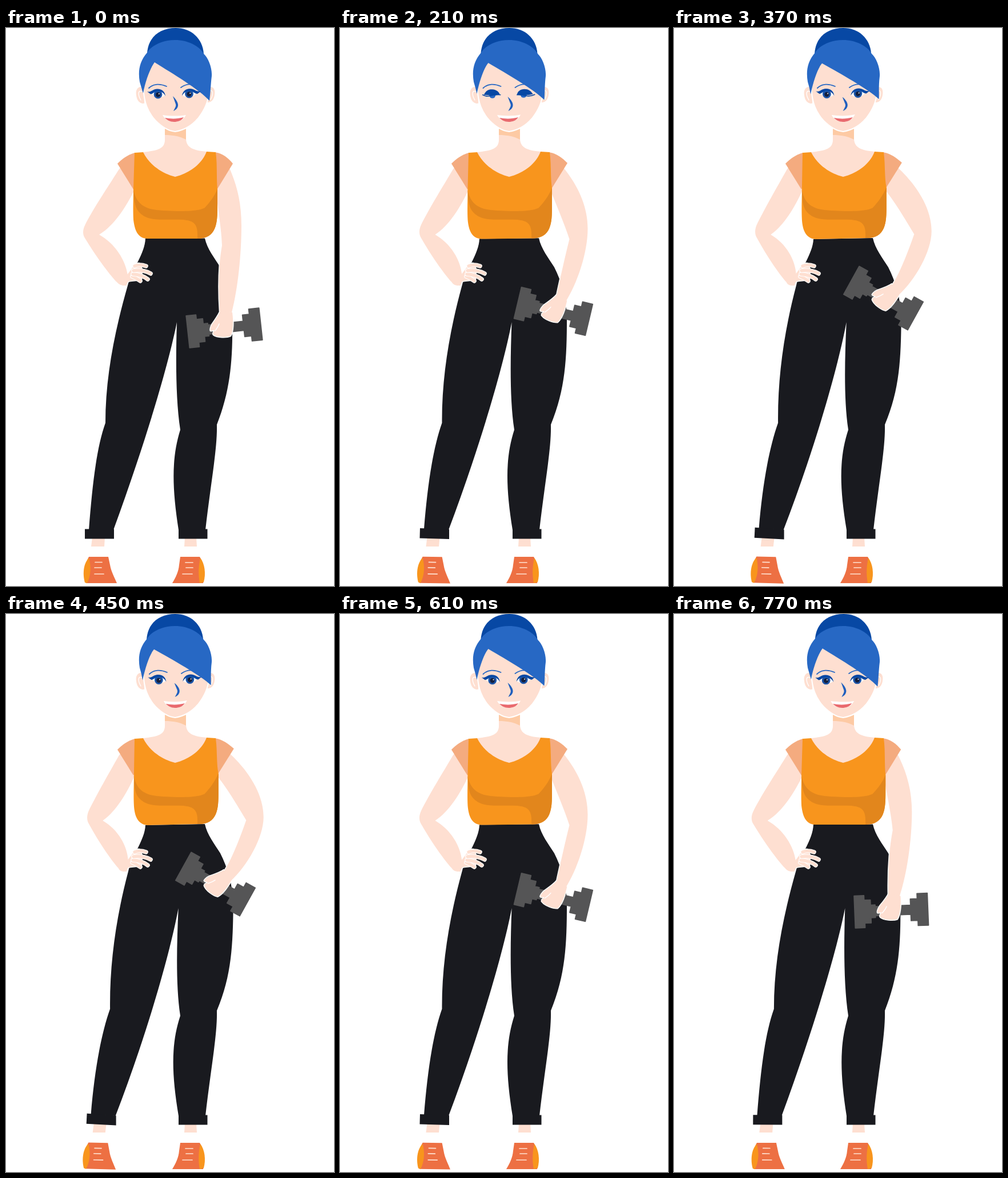
Write an HTML page that moves like this. It is 574 px wide and 975 px high and loops after 0.82 s.

```html
<!DOCTYPE html>
<html lang="en">
<head>
<meta charset="utf-8">
<title>Dumbbell lift</title>
<style>
html, body { margin: 0; width: 100%; height: 100%; overflow: hidden; background: #fff; }
svg { display: block; width: 100vw; height: 100vh; }
</style>
</head>
<body>
<svg id="stage" viewBox="0 0 574 975" preserveAspectRatio="none" stroke-linecap="round" stroke-linejoin="round"></svg>
<script>
const NS = "http://www.w3.org/2000/svg";
const stage = document.getElementById("stage");
const SKIN = "#fedfd1", TOP = "#f8951d", SHADE = "#e2861c", SLEEVE = "#f4ab7f";
const PANTS = "#191a1f", HAIR = "#2768c4", NAVY = "#0748a4", IRON = "#555556";
const SHOE = "#ed7043", LACE = "#ffe3d3";
const moving = [];

// In a path, "a~b" is a value that goes from a to a + b as the lift goes from 0 to 1.
const pose = (d, p) => d.replace(/(-?[\d.]+)~(-?[\d.]+)/g, (m, a, b) => (+a + b * p).toFixed(2));

function group(parent = stage) {
  return parent.appendChild(document.createElementNS(NS, "g"));
}

function shape(d, fill, parent = stage) {
  const el = document.createElementNS(NS, "path");
  el.setAttribute("d", pose(d, 0));
  el.setAttribute("fill", fill);
  if (d.includes("~")) moving.push([el, d]);
  return parent.appendChild(el);
}

function line(d, color, width, parent = stage, fill = "none") {
  const el = shape(d, fill, parent);
  el.setAttribute("stroke", color);
  el.setAttribute("stroke-width", width);
  return el;
}

// Feet
const leftShoe = group(), rightShoe = group();
shape("M145 924H179L182 938C184 950 190 960 194 970H140C136 955 138 936 145 924Z", SHOE, leftShoe);
shape("M145 926C135 936 134 955 138 969L142 970C149 956 149 940 145 926Z", TOP, leftShoe);
line("M156 933.5H168M155 943H167M155 954H171", LACE, 1.7, leftShoe);
shape("M305 924H339C348 938 348 958 345 970H291C297 960 302 950 303 938Z", SHOE, rightShoe);
shape("M340 926C348 936 350 954 346 968L339 970C336 954 337 940 340 926Z", TOP, rightShoe);
line("M314 934H327M315 943H327M309 954H326", LACE, 1.7, rightShoe);
shape("M151~3 890H173~3L172~2 906H149~3Z", SKIN);
shape("M313 890H333L334 906H312Z", SKIN);

// Trousers
shape("M244 367.5~1.5L348 367.5~-0.5C352 386 365 402 375 418C388 444 396 470 396~2 505" +
  "C397 575 394~2 630 369 693C370 735 359 790 349 877H302C290~-1 800 290~-1 750 305 702" +
  "C297 650 297~2 580 299~3 514C283~4 595 240~7 735 188~4 877" +
  "L145~4 877~-3C151~4 800 158~9 735 174~9 690C174~8 610 190~3 530 213~1 450C221 420 243 395 244 367.5~1.5Z", PANTS);
shape("M138~4 875.5~-3L189~4 875.5~1L189~4 892.5~1L138~3 892.5~-2Z", PANTS);
shape("M302 875.5H352.5V892.5H302Z", PANTS);

// Arm resting on the hip
const hipArm = "M226 240L199 245C180~2 275 150~7 320 138~7 345C134~8 353 134~8 361 138~8 367" +
  "C155~6 395 180~4 430 194~3 444C199 450 206 451 211 449L216 437L213~1 432C209~4 405 191~6 377 163~7 361" +
  "C190~3 345 212~2 310 226 280Z";
const palm = "M204 450C205 441 211 432 219 422C225 414 228 410 233 411L238 421L237 440L218 442Q211 442 211 450Z";
line(hipArm, "#fff", 2, stage, SKIN);
line(palm, "#fff", 2.4, stage, SKIN);
shape(hipArm, SKIN);
shape(palm, SKIN);
const fingers = [
  "M221 434Q228 437 235 442",
  "M222 430Q238 431 248 439",
  "M223 424Q240 422 253 429",
  "M225 416Q234 412 245 416"
];
for (const f of fingers) {
  line(f, "#fff", 7.6);
  line(f, SKIN, 5.4);
}

// Lifting arm, with a white rim round arm and hand together
const grip = group();
const bell = group(grip);
bell.setAttribute("transform", "rotate(-6.2)");
line("M-64 -28H-47V-20H-36V-11H-28V-8H34V-19H46V-28H64V28H46V19H34V8H-28V11H-36V20H-47V28H-64Z", IRON, 2, bell, IRON);

const liftArm = "M378 234L392~2 247~-1C404~23 275 412~43 305~11 412~43 345~11" +
  "C412~43 395~-6 406~19 455~-17 395~-3 497~-33L374~9 495~-51C371~30 450~-31 372~44 415~-33 378~47 380~-22" +
  "C377~31 350~-17 371~15 320~-22 367 280L365 240Z";
const fist = "M-7 -30C-9 -24 -16 -14 -21 -7C-24 -2 -25 4 -24 5C-22 6 -18 3 -17 4C-19 8 -21 10 -19 12" +
  "C-12 17 4 17 11 14C16 6 16 -12 14 -27Z";
line(liftArm, "#fff", 2.6);
const rim = group();
line(fist, "#fff", 2.8, rim);
shape(liftArm, SKIN);
const hand = group();
shape(fist, SKIN, hand);
line("M-9 -7C-11 -1 -14 2 -16 5", "#fff", 1.5, hand);

// Neck and top
shape("M278 176H315V194C316 208 325 214 352 216L345 245L296 265L246 245L240 217C268 214 278 210 278 195Z", SKIN);
shape("M278 176H315V195C304 189 292 187 278 187Z", "#fdcaa4");
shape("M225 218C212 222 203 229 195 237L223 282L230 270Z", SLEEVE);
shape("M366 217C380 220 388 226 397~2 237~-2L370~2 281~-3L362 260Z", SLEEVE);
const side = "L370~2 312C370~2 340 369~2 368 335 368~-1";
shape("M225 218L240 217C250 238 272 254 296 260C320 254 343 238 351 216L367 217C370 238 368 262 370~2 281~-3" +
  side + "L248 368~1C230 368 225 352 223~1 335C222~1 315 223~1 300 223~1 280Z", TOP);
shape("M223~1 283C228 305 240 318 275 319L300 320C330 320 340 318 348 314C357 304 365 294 370~2 281~-3" +
  side + "C336 345 332 337 310 335C275 333 246 341 230 318C225 309 224 300 223~1 283Z", SHADE);

// Head
shape("M247~-1 44C249~-1 15 270~-1 0 297~-1 0C324~-1 0 344~-1 18 346~-1 45Z", NAVY);
line("M241 104C232 99 226 106 227 116C228 128 235 135 243 132Z", "#fff", 1.5, stage, SKIN);
line("M353 104C361 99 367 105 366 115C365 127 358 133 350 130Z", "#fff", 1.5, stage, SKIN);
line("M238 111C231 108 230 116 236 126M356 110C363 107 363 116 358 125", "#fff", 1.3);
line("M240 100C241 130 248 147 262 162C274 174 286 180 296 181C309 179 324 172 336 158" +
  "C348 143 354 129 356 108L340 60H255Z", "#fff", 2, stage, SKIN);
shape("M247 43C253 32 272 21 296 21C318 21 338 31 346 45C354 52 361 70 360 84C358 100 358~1 113 356~3 127~-3" +
  "C338~2 107 292 80 260~-1 60~2C253~-1 69 244 92 240~-1 114~2" +
  "C237 104 236 101 234 94C231 76 233 59 247 43Z", HAIR);

// Face
function eye(x, y, white, lash, lid, rest) {
  const all = group(), open = group(all), shut = group(all);
  const disc = (r, fill, cx, cy, parent) =>
    shape(`M${cx - r} ${cy}a${r} ${r} 0 1 0 ${2 * r} 0a${r} ${r} 0 1 0 ${-2 * r} 0Z`, fill, parent);
  shape(white, "#fff", open);
  disc(7.4, "#1d55a8", x, y, open);
  disc(4.2, "#14203f", x, y + 0.5, open);
  disc(1, "#fff", x + 1.8, y - 1, open);
  shape(lash, NAVY, open);
  disc(5.5, HAIR, x, y + 1.5, shut);
  shape(lid, NAVY, shut);
  line(rest, NAVY, 1.6, shut);
  return { all, open, shut };
}
const eyes = [
  eye(266, 116, "M254 114C259 107 274 106 278 118C272 123 259 122 254 114Z",
    "M247 111C254 113 256 107 264 106.5C273 106 278 111 279 119C276 113 271 110 265 110.5C259 111 258 115 253 115.5Z",
    "M251 117C255 109 260 107 266 107.5C273 108 278 112 279 117Q265 119 251 117Z",
    "M249 117Q256 121 263 118.5T280 117"),
  eye(320.5, 115, "M309 118C313 106 328 106 333 113C329 122 317 123 309 118Z",
    "M308 118.5C309 111 314 106 322 106C330 106 332 112 341 110.5L335 115C330 115 328 110.5 322 110C316 109.5 311 113 308 118.5Z",
    "M309 116.5C310 111 315 107 322 107C329 107 333 110 337 116Q324 119 309 116.5Z",
    "M309 117Q316 116.5 324 118.5T340 116.5")
];
line("M250~1 105C258~1 97 270~1 97 281~1 102M306~1 104C313~1 99 319~1 97 328~1 99", HAIR, 1.8);
shape("M292~3 119~2C297~3 124 302~3 131 301~3 136C300~3 141 297~3 143 293~3 145C296~3 139 298~3 137 297~3 133Z", "#1f5fbe");
shape("M274~2 152C286~2 154 304~2 154 315~2 152~-1C311~2 160 303~2 164 294~2 164C285~2 163 278~2 160 274~2 152Z", "#fff");
shape("M278~2 157C289~2 159 300~2 159 311~2 156C307~2 162 301~2 164 294~2 164C287~2 164 282~2 161 278~2 157Z", "#e96a6e");

const LOOP = 820, HOLD = 50, STEP = 40;

function draw(ms) {
  const t = ms % LOOP;
  const n = t < HOLD ? 0 : Math.min(19, 1 + Math.floor((t - HOLD) / STEP));
  const p = 1 - Math.abs(n - 10) / 10;
  for (const [el, d] of moving) el.setAttribute("d", pose(d, p));

  const swing = (dx, dy) => `translate(${382 + dx * p} ${524 + dy * p}) rotate(${39.1 * p})`;
  grip.setAttribute("transform", swing(-17.2, -57.8));
  for (const g of [rim, hand]) g.setAttribute("transform", swing(-14, -53.5));
  leftShoe.setAttribute("transform", `translate(${-1.5 * p} 0) rotate(${1.6 * p} 165 950)`);

  const blink = n >= 2 && n <= 6;
  for (const e of eyes) {
    e.all.setAttribute("transform", `translate(${1.5 * p} ${-0.5 * p})`);
    e.open.setAttribute("display", blink ? "none" : "inline");
    e.shut.setAttribute("display", blink ? "inline" : "none");
  }
}

const start = performance.now();
function tick() {
  draw(performance.now() - start);
  requestAnimationFrame(tick);
}
draw(0);
requestAnimationFrame(tick);
</script>
</body>
</html>
```
